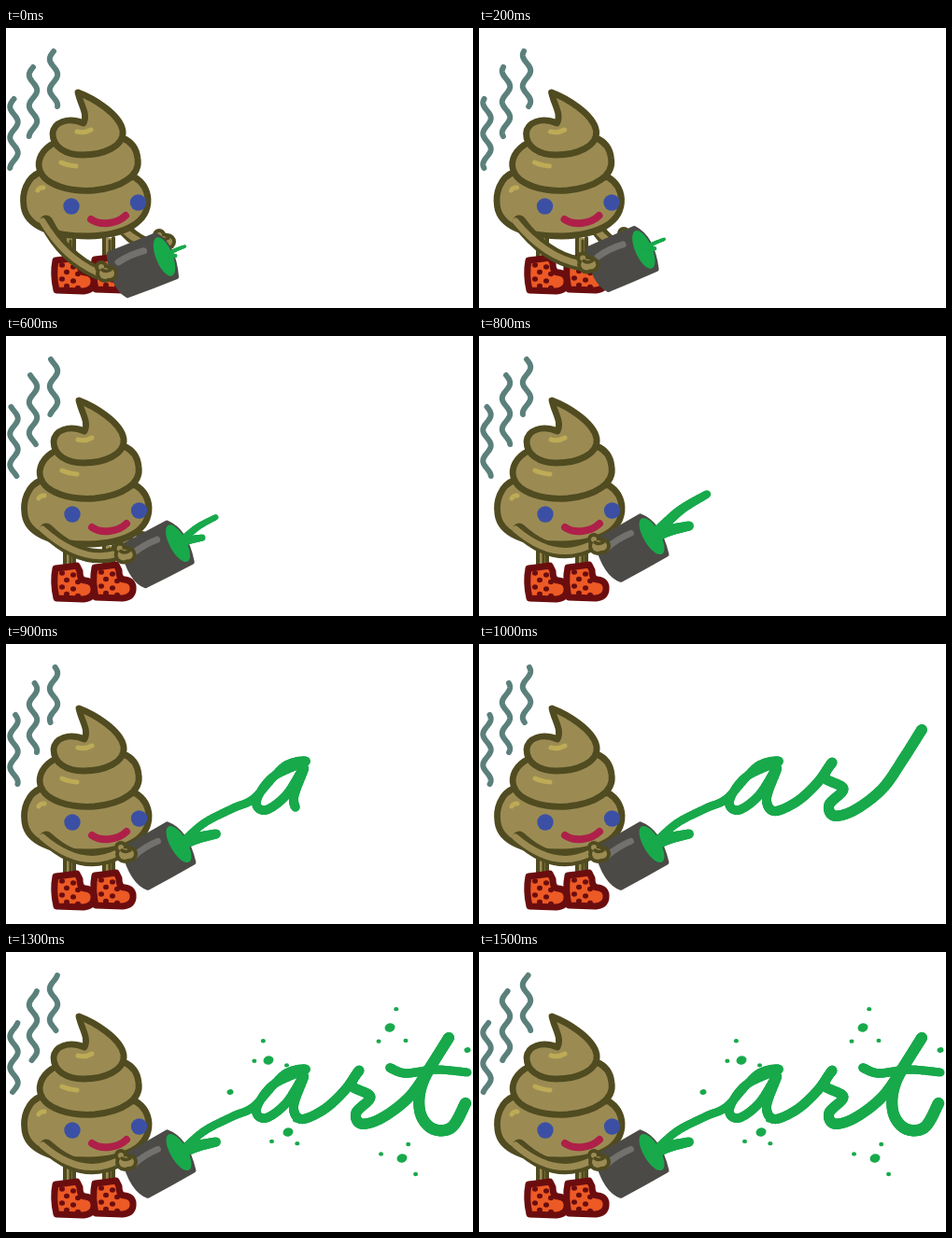
Recreate the animation shown at these times as an HTML page with a canvas. Size 500 by 300 pixels, loop 1.6 s.

```html
<!DOCTYPE html>
<html lang="en">
<head>
<meta charset="utf-8">
<title>Art</title>
<style>
html, body { margin: 0; width: 100%; height: 100%; overflow: hidden; background: #fff; }
canvas { display: block; }
</style>
</head>
<body>
<canvas id="stage" width="500" height="300"></canvas>
<script>
const ctx = document.getElementById('stage').getContext('2d');
const STEP = 100, STEPS = 16, TAU = Math.PI * 2;
const DARK = '#504b20', SKIN = '#9b8b53', SHINE = '#bdab56', GREEN = '#18a94b';
const BOOT = '#6b0d0f', IRON = '#4b4a46', STEAM = '#5b807c';
ctx.lineCap = ctx.lineJoin = 'round';

const lerp = (a, b, k) => a + (b - a) * k;
const clamp = v => Math.max(0, Math.min(1, v));

function shape(path, fill, stroke, width) {
  const p = new Path2D(path);
  if (fill) { ctx.fillStyle = fill; ctx.fill(p); }
  if (stroke) { ctx.strokeStyle = stroke; ctx.lineWidth = width; ctx.stroke(p); }
}

function oval(x, y, rx, ry, color, angle = 0) {
  ctx.beginPath();
  ctx.ellipse(x, y, rx, ry, angle, 0, TAU);
  ctx.fillStyle = color;
  ctx.fill();
}

function spline(a, b, c, d, t) {
  return b.map((v, i) => v + 0.5 * t * (c[i] - a[i] + t * (2 * a[i] - 5 * v + 4 * c[i] - d[i]
    + t * (3 * (v - c[i]) + d[i] - a[i]))));
}

// Smooth green stroke whose width runs from w0 to w1, drawn up to a point index
function brush(points, w0, w1, end = points.length - 1) {
  const n = 10, total = points.length - 1;
  const at = i => points[Math.max(0, Math.min(total, i))];
  ctx.strokeStyle = GREEN;
  let last = points[0];
  for (let s = 1; s <= end * n; s++) {
    const i = Math.floor(s / n);
    const p = spline(at(i - 1), at(i), at(i + 1), at(i + 2), s / n - i);
    ctx.lineWidth = lerp(w0, w1, s / n / total);
    ctx.beginPath();
    ctx.moveTo(...last);
    ctx.lineTo(...p);
    ctx.stroke();
    last = p;
  }
}

// A wave that climbs one wavelength per loop
function steam(x, top, bottom, step) {
  ctx.beginPath();
  for (let y = top; y <= bottom; y++)
    ctx.lineTo(x - 4.2 * Math.sin(TAU * ((y - top) / 33 + step / STEPS)), y);
  ctx.strokeStyle = STEAM;
  ctx.lineWidth = 6;
  ctx.stroke();
}

function leg(x, y) {
  shape(`M${x - 5} 225V${y}H${x + 5}V225`, SKIN, DARK, 4);
  shape(`M${x + 1} 228V${y - 3}`, null, DARK, 3);
}

function boot(x, y) {
  ctx.save();
  ctx.translate(x, y);
  shape('M4 5Q14 4 27 2L30 8Q30 18 36 18Q46 19 45 29Q44 37 34 38L5 37Q1 20 4 5Z', '#ec5a25', BOOT, 7);
  for (let i = 0; i < 8; i++) {
    const row = i >> 1;
    oval(11 + (i % 2) * 12 + (row % 2) * 5, 10 + row * 7.5 + (i % 2) * 2, 3, 2.8, BOOT);
  }
  ctx.restore();
}

function body() {
  const lobe = path => shape(path, SKIN, DARK, 6.8);
  const shine = path => shape(path, null, SHINE, 5);
  lobe('M38 154C21 160 17 178 19 191C22 213 50 223 88 223C128 222 153 208 152 183C151 172 146 165 138 160Z');
  lobe('M52 123C38 130 33 142 36 152C41 168 68 176 94 174C124 171 144 158 141 140C140 130 135 122 125 118Z');
  lobe('M77 69C93 75 122 92 125 110C127 127 104 136 82 136C63 136 50 127 50 113C51 101 66 95 83 102C88 92 80 83 77 69Z');
  shine('M76 111Q84 113 91 109');
  shine('M59 144Q65 147 75 148');
  shine('M34 174Q35 171 40 171');
  oval(70, 191, 8.7, 8.7, '#3b50a4');
  oval(141.5, 187, 8.7, 8.7, '#3b50a4');
  shape('M91 205C101 212 119 210 128 201', null, '#ae2049', 8);
}

function limb(x, y, cx, cy, hx, hy) {
  shape(`M${x + 3} ${y} Q${cx} ${cy} ${hx} ${hy}`, null, DARK, 15);
  shape(`M${x - 1} ${y - 1} Q${cx} ${cy} ${hx} ${hy}`, null, SKIN, 7);
}

function hand(x, y) {
  for (const [grow, color] of [[4, DARK], [0, SKIN]]) {
    oval(x, y + 1, 6 + grow, 6 + grow, color);
    oval(x - 4, y - 6, 3 + grow, 3 + grow, color);
    oval(x + 5, y + 1, 5 + grow, 5 + grow, color);
  }
  shape(`M${x - 3} ${y - 3}q4 3 9 0`, null, DARK, 3.5);
}

function can(x, y, angle) {
  ctx.save();
  ctx.translate(x, y);
  ctx.rotate(angle * Math.PI / 180);
  shape('M-54 -25L0 -25Q14 -8 4 25Q-24 25 -52 24Q-64 10 -54 -25Z', IRON, IRON, 5);
  shape('M-48 -13Q-32 -16 -18 -14', null, '#72716d', 7);
  oval(0, 0, 9, 22, GREEN);
  ctx.restore();
}

const word = [
  [187, 214], [212, 192], [243, 176], [266, 165], [298, 131], [321, 126], [285, 143], [268, 169],
  [278, 178], [300, 162], [319, 133], [308, 165], [316, 179], [340, 169], [362, 149], [378, 127],
  [370, 143], [390, 155], [375, 172], [380, 184], [402, 178], [432, 155], [455, 122], [474, 92],
  [447, 138], [443, 170], [456, 189], [477, 188], [492, 162]
];
const bar = [[411, 124], [428, 130], [460, 126], [494, 129]];
const splashes = [[281, 116], [302, 193], [411, 81], [424, 221], [240, 150], [494, 105]];

function random(seed) {
  const v = Math.sin(seed * 91.7) * 4375.5;
  return v - Math.floor(v);
}

function splatter() {
  splashes.forEach(([x, y], i) => {
    const size = i < 4 ? 5.5 : 3.5;
    oval(x, y, size, size * 0.85, GREEN, -0.3);
    if (i > 3) return;
    for (let j = 1; j <= 3; j++) {
      const a = TAU * (j / 3 + random(i * 3 + j) * 0.2), far = 14 + 9 * random(i + j * 7);
      oval(x + far * Math.cos(a), y + far * Math.sin(a), 2.5, 2.2, GREEN);
    }
  });
}

function liquid(x, y, step) {
  const grow = clamp((step - 4) / 4), w = lerp(4, 10, grow);
  const jet = (dx, dy, width) => brush(
    [[x + 1, y], [x + dx * 0.5, y + dy * 0.6], [x + dx, y + dy]], width * 1.4, width);
  jet(lerp(12, 40, grow), lerp(-1, -11, grow), w);
  if (step <= 8) return jet(lerp(22, 59, grow), lerp(-11, -45, grow), w * 0.85);
  brush(word, 8.5, 12.5, Math.min(word.length - 1, (step - 8) * 11.5));
  if (step < 12) return;
  brush(bar, 10, 9);
  splatter();
}

function draw(step) {
  const lift = clamp(step / 8), ease = 1 - (1 - lift) ** 2;
  const cx = lerp(169.5, 185, ease), cy = lerp(245, 214.5, lift);
  const hx = lerp(106, 127, ease), hy = lerp(262, 224, lift);
  const backX = lerp(168, 150, clamp(step / 4)), backY = lerp(228, 220, lift);

  ctx.fillStyle = '#fff';
  ctx.fillRect(0, 0, 500, 300);
  steam(8.5, 76, 150, step);
  steam(29, 42, 116, step);
  steam(51, 25, 84, step);
  leg(68, 249);
  leg(110, 248);
  boot(91, 243);
  boot(49, 244);
  limb(122, 212, 132, 224, backX - 18, backY + 4);
  hand(backX, backY);
  ctx.save();
  ctx.translate(clamp(step / 4), 0);
  body();
  ctx.restore();
  can(cx, cy, lerp(-22, -30, lift));
  liquid(cx, cy, step);
  limb(40, 208, lerp(62, 81, ease), lerp(246, 243, lift), hx - 8, hy);
  hand(hx, hy);
}

function tick() {
  draw(Math.floor(performance.now() / STEP) % STEPS);
  requestAnimationFrame(tick);
}
tick();
</script>
</body>
</html>
```
